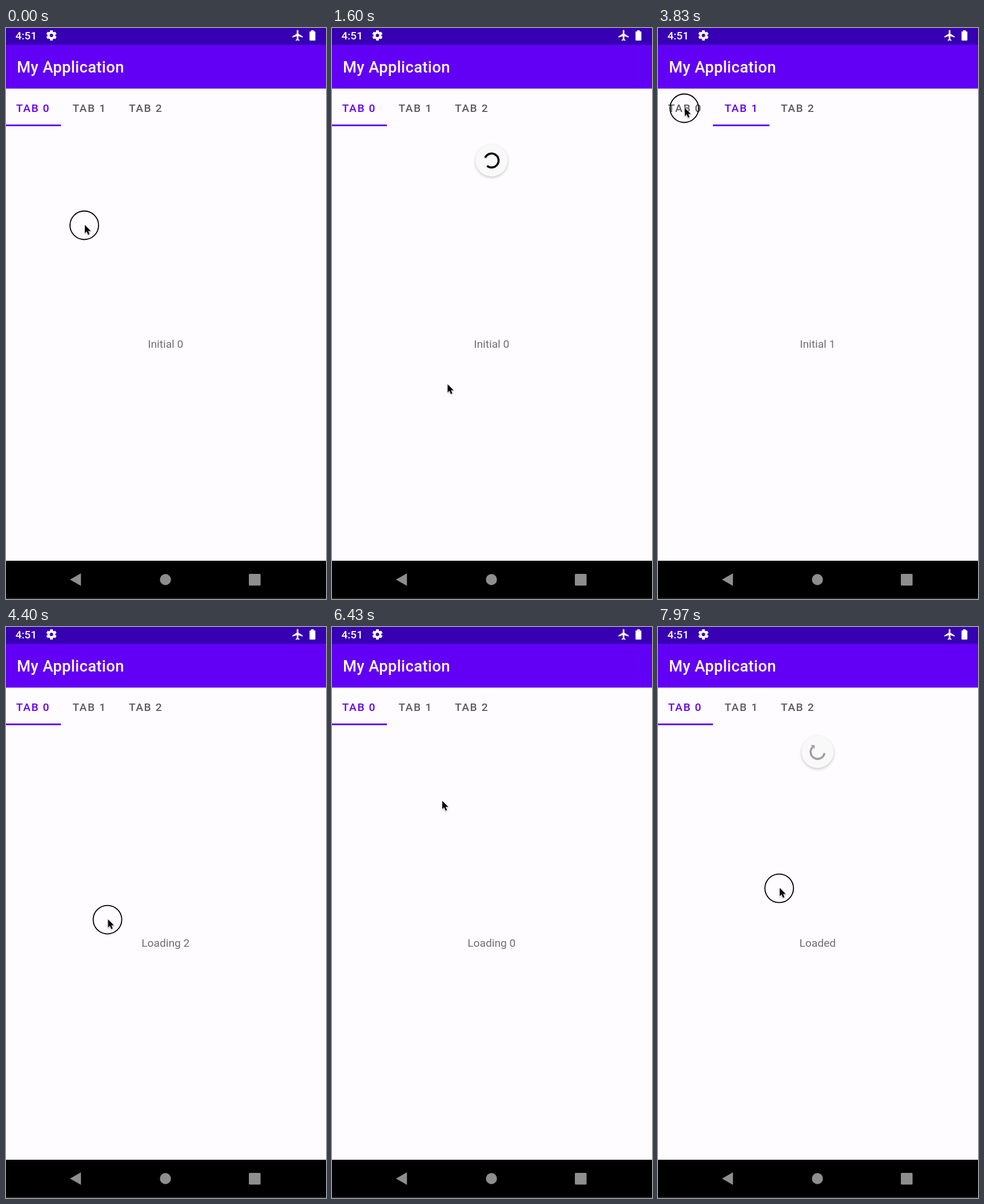
An HTML page that plays this animation: 560 px wide and 1000 px high, repeating every 8 s.

```html
<!DOCTYPE html>
<html lang="en">
<head>
<meta charset="utf-8">
<title>Pull to refresh</title>
<style>
  html, body { margin: 0; width: 100%; height: 100%; overflow: hidden; background: #fefcff; }
  svg { display: block; width: 560px; height: 1000px; font-family: Roboto, sans-serif; }
  .tab { font-weight: 500; font-size: 19.2px; letter-spacing: 1.65px; }
  .label { font-size: 19.2px; fill: #6e6d6f; text-anchor: middle; }
  .title { font-weight: 500; font-size: 27.4px; letter-spacing: .36px; }
  #disc { filter: drop-shadow(0 2px 2.5px rgba(0, 0, 0, .22)); }
  #cursor { filter: drop-shadow(0 1px 1px rgba(0, 0, 0, .35)); }
</style>
</head>
<body>
<svg viewBox="0 0 560 1000">
  <defs><clipPath id="page"><rect y="172" width="560" height="761"/></clipPath></defs>
  <rect width="560" height="1000" fill="#fefcff"/>
  <rect y="106" width="560" height="1" fill="#e6ddf3"/>
  <rect y="29" width="560" height="77" fill="#6200f5"/>
  <rect width="560" height="29.5" fill="#3700b3"/>

  <g fill="#fff">
    <text x="16.5" y="20" font-size="19" font-weight="500">4:51</text>
    <text class="title" x="19" y="78">My Application</text>
    <g id="gear" transform="translate(79.5 13)">
      <circle r="5" fill="none" stroke="#fff" stroke-width="4"/>
    </g>
    <path transform="translate(499.3 1.5) scale(.95)" d="M21 16v-2l-8-5V3.5a1.5 1.5 0 0 0-3 0V9l-8 5v2l8-2.5V19l-2 1.5V22l3.5-1 3.5 1v-1.5L13 19v-5.5z"/>
    <rect x="534" y="4" width="4.600" height="4"/>
    <rect x="531.200" y="6" width="10.200" height="16" rx="1.200"/>
  </g>

  <g id="tabs"></g>
  <rect id="bar" y="169" height="3" fill="#6200f0"/>

  <g clip-path="url(#page)">
    <text id="first" class="label" y="560"></text>
    <text id="second" class="label" y="560">Initial 1</text>
    <g id="spinner">
      <circle id="disc" r="28" fill="#faf9fa"/>
      <g id="ink">
        <path id="arc" fill="none" stroke="#000" stroke-width="3.6"/>
        <path id="arrow" d="M-6.500 0H6.500L0 6.500z"/>
      </g>
    </g>
  </g>

  <rect y="933" width="560" height="67"/>
  <rect y="998" width="560" height="2" fill="#222"/>
  <g fill="#8e8e8e">
    <path d="M112 966L131.200 955V977z"/>
    <circle cx="279" cy="966" r="9.700"/>
    <rect x="425" y="956" width="20.500" height="20.500" rx="1.500"/>
  </g>

  <g id="pointer">
    <circle id="press" r="25" fill="none" stroke="#000" stroke-width="1.800"/>
    <path id="cursor" transform="translate(1 -.5) scale(.92)" d="M0 0V15.500l3.500-3.300 2.700 6.300 2.700-1.200-2.600-6h5z"
      stroke="#fff" stroke-width="1.200" paint-order="stroke"/>
  </g>
</svg>
<script>
const $ = id => document.getElementById(id);
const LOOP = 8000;
const clamp = (v, a = 0, b = 1) => Math.min(b, Math.max(a, v));
const mix = (a, b, k) => a + (b - a) * k;
const smooth = k => k * k * (3 - 2 * k);
const cubicOut = k => 1 - (1 - k) ** 3;

function add(parent, tag, attrs) {
  const el = document.createElementNS("http://www.w3.org/2000/svg", tag);
  for (const name in attrs) el.setAttribute(name, attrs[name]);
  return parent.appendChild(el);
}
function set(id, attrs) {
  for (const name in attrs) $(id).setAttribute(name, attrs[name]);
}
const show = (id, on) => $(id).style.display = on ? "" : "none";

for (let i = 0; i < 6; i++)
  add($("gear"), "rect", { x: -2.4, y: -9, width: 4.8, height: 4, rx: .6, transform: `rotate(${i * 60})` });

const tabs = [0, 1, 2].map(i => {
  const el = add($("tabs"), "text", { class: "tab", x: 17.8 + 98.6 * i, y: 147 });
  el.textContent = "TAB " + i;
  return el;
});

// A pull drags for most of its press, then holds; a rest is a stop without a press
const pull = (down, up, from, to) => ({ down, up, from, to });
const tap = (down, at) => pull(down, down + 110, at, at);
const rest = (time, at) => pull(time, time, at, at);

const firstPull = pull(680, 1400, [150, 298], [203, 779]);
const lastPull = pull(7150, 8680, [192, 305], [217, 495]);
const gestures = [
  tap(-80, [137, 345.5]),
  rest(400, [155, 431]),
  firstPull,
  pull(2130, 2440, [198, 300], [183, 750]),
  tap(2610, [179.5, 333.5]),
  tap(3220, [145, 140]),
  tap(3800, [46, 140.5]),
  pull(4280, 4630, [178, 290], [177, 794]),
  rest(4900, [177, 794]),
  pull(5110, 5630, [183, 285], [181, 866]),
  lastPull
];
const TRAVEL = 530, DRAG = .75;

function pointerAt(t) {
  const i = gestures.findLastIndex(g => g.down <= t);
  const g = gestures[i], next = gestures[i + 1];
  const along = (a, b, k) => a.map((v, j) => mix(v, b[j], smooth(clamp(k))));
  if (t < g.up) return along(g.from, g.to, (t - g.down) / (g.up - g.down) / DRAG);
  return along(g.to, next.from, (t - g.up) / Math.min(TRAVEL, next.down - g.up));
}
const pressing = (g, t) => t >= g.down && t < g.up;

// Selected page, 0 to 1
const slide = (t, start) => cubicOut(clamp((t - start) / 250));
const pageAt = t => slide(t, 3330) - slide(t, 3930);

function labelAt(t) {
  if (t < 1630) return "Initial 0";
  return t < 6630 ? "Loading " + (4 - Math.floor((t - 1630) / 1000)) : "Loaded";
}

// cubic-bezier(.4, 0, .2, 1)
function fastOutSlowIn(x) {
  let lo = 0, hi = 1;
  for (let i = 0; i < 16; i++) {
    const u = (lo + hi) / 2, v = 1 - u;
    if (1.2 * v * v * u + .6 * v * u * u + u ** 3 < x) lo = u; else hi = u;
  }
  return 3 * (1 - lo) * lo * lo + lo ** 3;
}

// Spinner while the page is pulled to pointer height y; angles in turns
const REACH = 88, REST = 232;
function pulled(y) {
  const over = Math.max(0, (y - 308) / 2);
  const part = clamp(over / REACH);
  const q = clamp(over - REACH, 0, REACH * 2) / REACH / 4;
  const tension = (q - q * q) * 2;
  const grown = Math.max(part - .4, 0) / .6;
  const turn = (-.25 + .4 * grown + tension * 2) / 2;
  return {
    y: 144 + REACH * part + REACH * tension * 2,
    from: turn, to: turn + .8 * grown,
    head: grown, alpha: part < 1 ? .36 : 1
  };
}

// After release: settle, shrink the arc once, then spin in cycles
const SETTLED = 1600, SPIN = 2210, CYCLE = 1332, SPIN_TURN = .93, SPAN = .79;
function spinnerAt(t) {
  if (pressing(firstPull, t) || pressing(lastPull, t)) return pulled(pointerAt(t)[1]);
  if (t < firstPull.up || t > 3600) return null;
  const base = pulled(firstPull.to[1]);
  const settle = cubicOut(clamp((t - firstPull.up) / (SETTLED - firstPull.up)));
  const s = { y: mix(base.y, REST, settle), head: 0, alpha: 1 };
  if (t < SPIN) {
    const k = clamp((t - SETTLED) / (SPIN - SETTLED));
    const turn = mix(base.from, SPIN_TURN, k);
    s.from = turn + SPAN * k;
    s.to = turn + SPAN + .01;
    return s;
  }
  const cycles = (t - SPIN) / CYCLE, k = cycles % 1;
  const turn = .6 * cycles + SPIN_TURN + SPAN + .21 * k;
  s.from = turn + SPAN * fastOutSlowIn(clamp(k * 2 - 1));
  s.to = turn + SPAN * fastOutSlowIn(clamp(k * 2)) + .01;
  return s;
}

function drawSpinner(s, x) {
  show("spinner", s);
  if (!s) return;
  const R = 12.2;
  const at = turn => `${R * Math.cos(turn * 2 * Math.PI)} ${R * Math.sin(turn * 2 * Math.PI)}`;
  const large = s.to - s.from > .5 ? 1 : 0;
  set("spinner", { transform: `translate(${x} ${s.y})` });
  set("arc", { d: `M${at(s.from)}A${R} ${R} 0 ${large} 1 ${at(s.to)}` });
  set("arrow", { transform: `rotate(${s.to * 360}) translate(${R} 0) scale(${s.head})` });
  set("ink", { opacity: s.alpha });
}

function draw(t) {
  const page = pageAt(t);
  const x = 279.3 - 560 * page;
  $("first").textContent = labelAt(t);
  set("first", { x });
  set("second", { x: x + 560 });
  set("bar", { x: 96 * page, width: 96 + 3 * page });
  const active = page > .5 ? 1 : 0;
  tabs.forEach((el, i) => el.setAttribute("fill", i === active ? "#6200f0" : "#5c5b5d"));
  drawSpinner(spinnerAt(t), x);
  set("pointer", { transform: `translate(${pointerAt(t).join(" ")})` });
  show("press", gestures.some(g => pressing(g, t)));
}

const begin = performance.now();
function frame() {
  draw((performance.now() - begin) % LOOP);
  requestAnimationFrame(frame);
}
frame();
</script>
</body>
</html>
```
